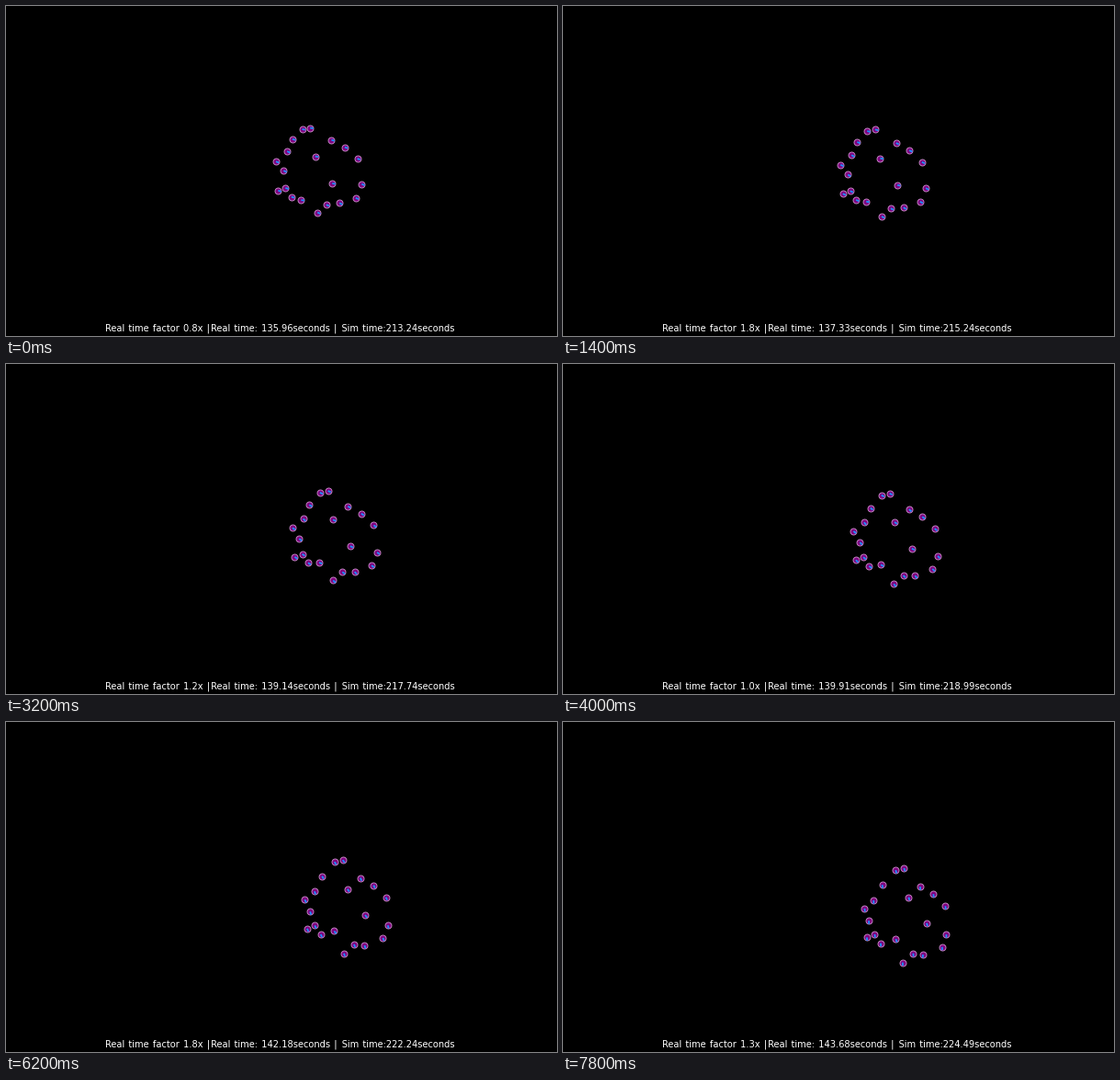
Write a matplotlib script that moves like this. It is 600x359 px and loops after 8000 ms.

```python
import numpy as np
import matplotlib.pyplot as plt
from matplotlib.animation import FuncAnimation
from matplotlib.collections import EllipseCollection, LineCollection

W, H, DPI = 600, 359, 100
PX = 72 / DPI
FRAMES, STEP_MS = 40, 200
TICK = 0.25          # simulated seconds per tick
SIM_START = 213.24
SPEED = 4.5          # pixels per simulated second
RADIUS = 3.5
HAIR = "\u200a"

# Each robot: start x, start y, heading offset in degrees
ROBOTS = np.array([
    (322.5, 134, -9), (331.2, 132.5, -10), (312, 144.7, -1), (306.2, 158.1, 5),
    (294, 169.2, 1), (302.4, 179.1, 7), (296.4, 200.7, 1), (304.4, 197.9, 0),
    (310.8, 207.5, 0), (321.4, 211.1, -12), (339.2, 224.5, 7), (348.8, 216.2, 4),
    (363.2, 214.3, 10), (380.8, 208.7, 5), (387.4, 193.5, 8), (382.6, 166, 2),
    (368.9, 153.5, 1), (354.4, 145.5, 1), (336.7, 163.5, -9), (355.3, 193, -11)])
START = ROBOTS[:, 0] + 1j * ROBOTS[:, 1]
AIM = np.exp(1j * np.radians(ROBOTS[:, 2]))

# Wall clock and speed factor at a few frames, linear in between
KEYS = (0, 7, 11, 20, 26, 31, 39)
CLOCK = (135.96, 137.33, 138.18, 139.91, 141.11, 142.18, 143.68)
FACTOR = (0.8, 1.8, 1.5, 1.0, 0.9, 1.8, 1.3)


def sim_time(k):
    """One tick per frame, plus a catch-up tick every six or seven frames."""
    return TICK * (k + (2 * k + 5) // 13)


def direction(t):
    """Shared heading at time t as a unit complex number."""
    return np.exp(1j * np.radians(20 + 1.6 * t + 0.345 * t * t))


def drift(t, steps=200):
    """Distance covered at constant speed along the turning heading."""
    mid = (np.arange(steps) + 0.5) / steps * t
    return SPEED * t * direction(mid).mean()


def to_xy(z):
    return np.column_stack([z.real, z.imag])


def caption(k):
    factor = np.interp(k, KEYS, FACTOR)
    clock = round(float(np.interp(k, KEYS, CLOCK)), 2)
    sim = SIM_START + sim_time(k)
    text = (f"Real time factor {factor:.1f}x |Real time: {clock}seconds"
            f" | Sim time:{sim:.2f}seconds")
    return text.replace(" ", " " + HAIR).replace("|", "|" + HAIR)


fig = plt.figure(figsize=(W / DPI, H / DPI), dpi=DPI, facecolor="black")
ax = fig.add_axes([0, 0, 1, 1])
ax.set(xlim=(0, W), ylim=(H, 0))
ax.axis("off")

bodies = EllipseCollection(
    [2 * RADIUS], [2 * RADIUS], [0], units="xy", offsets=to_xy(START),
    offset_transform=ax.transData, facecolors="#800080",
    edgecolors="#c88cc8", linewidths=0.9 * PX)
pointers = LineCollection([], colors="#1e90ff", linewidths=1.9 * PX,
                          capstyle="butt", zorder=3)
ax.add_collection(bodies)
ax.add_collection(pointers)
label = ax.text(298.7, 354, "", color="white", family="DejaVu Sans",
                size=9.9 * PX, ha="center", va="baseline")


def draw(k):
    t = sim_time(k)
    pos = START + AIM * drift(t)
    tip = pos + RADIUS * AIM * direction(t)
    bodies.set_offsets(to_xy(pos))
    pointers.set_segments(np.stack([to_xy(pos), to_xy(tip)], axis=1))
    label.set_text(caption(k))
    return bodies, pointers, label


anim = FuncAnimation(fig, draw, frames=FRAMES, interval=STEP_MS, repeat=True)
plt.show()
```
